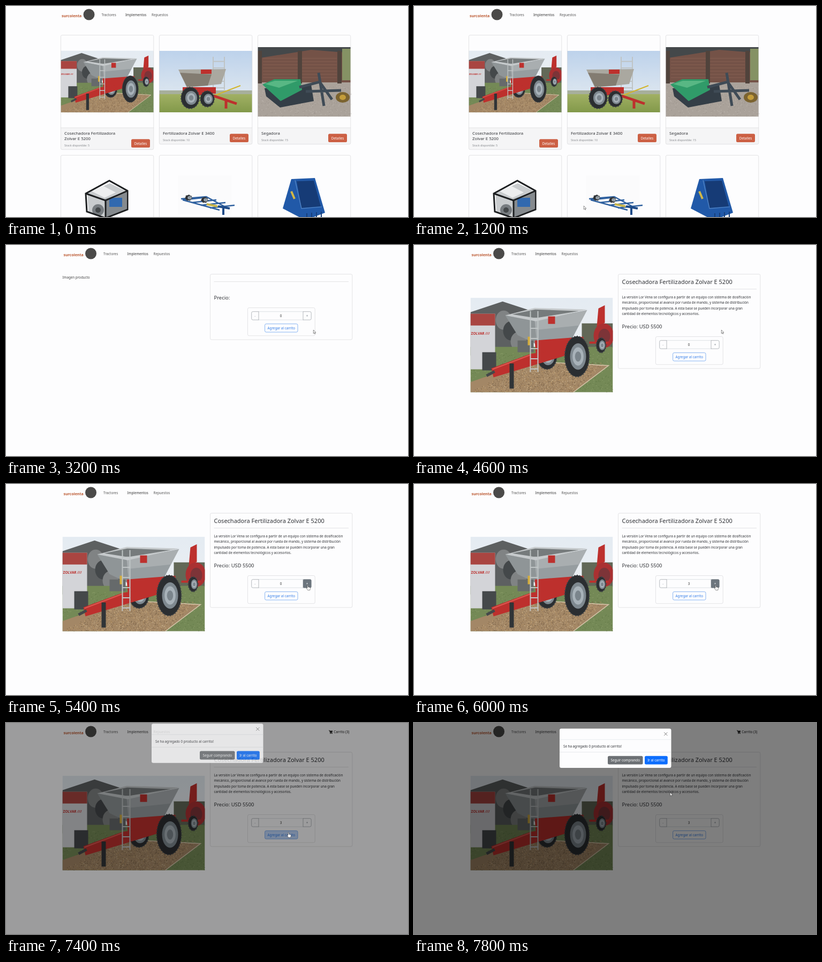
An HTML page for the animation above (8 s loop, 751 by 395 pixels).

```html
<!DOCTYPE html>
<html lang="es">
<head>
<meta charset="utf-8">
<title>Tienda de equipos</title>
<style>
  html, body { margin: 0; width: 100%; height: 100%; overflow: hidden; background: #fdfdfe; }
  svg { display: block; width: 100%; height: 100%; }
  text { font-family: "Noto Sans", "Open Sans", sans-serif; white-space: pre; }
</style>
</head>
<body>
<svg id="stage" viewBox="0 0 751 395"></svg>
<script>
const LOOP = 8000, STEP = 200;
const OPENED = 2200, LOADED = 4600, ADDED = 7400;
const MODEL = 'Zolvar E 5200';
const PAPER = '#fdfdfe', INK = '#303236', LINE = '#d9d9dc', GREY = '#6c757d', EDGE = '#979da2';
const RED = '#bd302d', STEEL = '#a9aeb0', DARK = '#44484a', BLUE = '#0d6efd', SOFT_BLUE = '#5795ec';
const BODY = 6.25;

const text = (x, y, size, str, fill = '#444', more = '') =>
  `<text x="${x}" y="${y}" font-size="${size}" fill="${fill}" ${more}>${str}</text>`;
const mid = (x, y, str, fill) => text(x, y, BODY, str, fill, 'text-anchor="middle"');
const rect = (x, y, w, h, fill, more = '') =>
  `<rect x="${x}" y="${y}" width="${w}" height="${h}" fill="${fill}" ${more}/>`;
const box = (x, y, w, h, r = 2.6, stroke = LINE) =>
  rect(x, y, w, h, 'none', `rx="${r}" stroke="${stroke}" stroke-width=".7"`);
const poly = (fill, points) => `<polygon fill="${fill}" points="${points}"/>`;
const line = (stroke, width, d) =>
  `<path d="${d}" fill="none" stroke="${stroke}" stroke-width="${width}"/>`;
const oval = (x, y, rx, ry, fill) => `<ellipse cx="${x}" cy="${y}" rx="${rx}" ry="${ry}" fill="${fill}"/>`;
const repeat = (n, make) => Array.from({ length: n }, (_, i) => make(i)).join('');
const during = (from, to, body) => `<g data-from="${from}" data-to="${to}">${body}</g>`;
const gradient = (id, top, bottom) => `<linearGradient id="${id}" x2="0" y2="1">
  <stop stop-color="${top}"/><stop offset="1" stop-color="${bottom}"/></linearGradient>`;
const mix = (a, b, k) => a + (b - a) * k;

let seed = 7;
const random = () => (seed = seed * 16807 % 2147483647) / 2147483647;

// Seeded specks between two horizontal edges, each given as [y, left, right].
const specks = (top, bottom, count, size, colours) => colours.map(colour =>
  line(colour, size, repeat(count, () => {
    const v = random(), [y, left, right] = top.map((a, i) => mix(a, bottom[i], v));
    return `M${mix(left, right, random()).toFixed(1)} ${y.toFixed(1)}h${size * 1.5}`;
  }))).join('');

const wheel = (x, y, rx, ry) => oval(x, y, rx, ry, '#2b2e31') +
  `<ellipse cx="${x}" cy="${y}" rx="${rx}" ry="${ry}" fill="none" stroke="#42464a" stroke-width="2" stroke-dasharray="2 3"/>` +
  ['#7f8990', '#a8b2b9', '#7b858c'].map((c, i) =>
    oval(x + 2, y, rx * (.65 - i * .2), ry * (.65 - i * .2), c)).join('');

const ladder = (x, y, width, height, rungs) => line('#bfc4c5', 2,
  `M${x} ${y}v${height}M${x + width} ${y}v${height}` +
  repeat(rungs, i => `M${x} ${y + (i + .7) * height / rungs}h${width}`));

const spreader = '<symbol id="spreader" viewBox="0 0 266 177">' +
  rect(0, 0, 266, 177, 'url(#haze)') +
  poly('#5d6061', '0,27 60,7 112,24 112,108 0,108') +
  repeat(3, i => oval(62 + i * 14, 42 + i * 20, 15, 18, i % 2 ? DARK : '#808384')) +
  rect(208, 48, 58, 45, '#626857') +
  rect(0, 92, 266, 85, '#748956') + specks([104, 0, 266], [177, 0, 266], 350, 1, ['#5f7643', '#8a9d68']) +
  poly('#a38766', '0,158 110,119 258,127 192,177 0,177') +
  specks([122, 105, 250], [177, 0, 192], 450, 1, ['#c9b18c', '#775f45', '#b79466']) +
  line('#d3c3a8', 1.5, 'M110 119L258 127L192 177') +
  rect(0, 30, 46, 104, '#d3d4d8') + rect(0, 30, 46, 22, '#a94541') + rect(22, 102, 26, 34, DARK) +
  text(1, 69, 6.5, 'ZOLVAR ///', RED, 'font-weight="700"') +
  poly(RED, '239,20 251,14 251,47 236,54') +
  oval(249, 71, 19, 23, '#aa3132') + oval(250, 72, 11, 14, '#7d3438') + line(RED, 4, 'M222 84H258') +
  wheel(244, 89, 9, 14) + wheel(143, 112, 18, 22) +
  poly('#8f9597', '65,33 122,43 125,88 88,70') +
  poly(STEEL, '120,42 218,23 188,80 124,86') +
  poly('#969da0', '124,60 202,52 188,80 124,86') +
  poly('#c6cacc', '65,33 120,19 218,22 122,44') + poly('#767b7c', '78,31 121,22 202,25 122,38') +
  rect(145, 35, 13, 14, RED) + rect(88, 80, 30, 22, '#666a6b') + rect(107, 73, 5, 16, '#d2ac3f') +
  poly(RED, '120,80 211,73 211,92 122,104') +
  poly(RED, '39,132 112,105 185,94 185,106 43,149') + line('#dc5850', 2, 'M41 134L112 107') +
  line(DARK, 5, 'M30 146L45 138') + line('#303437', 8, 'M77 123V170') +
  ladder(112, 25, 14, 114, 6) + wheel(199, 110, 23, 38) + '</symbol>';

const field = rect(286, 84, 174, 115, 'url(#sky)') + rect(286, 158, 174, 8, '#a7af9c') +
  rect(286, 165, 174, 34, 'url(#field)') + ladder(387, 95, 21, 62, 5) +
  poly('#aaa8a0', '322,119 411,118 402,146 338,153') + poly('#837c71', '325,125 384,128 377,149 338,151') +
  rect(364, 119, 20, 8, RED) + line('#d2b52d', 2, 'M386 169L438 149') +
  rect(330, 152, 62, 12, RED) + line(RED, 5, 'M348 162L390 169L431 183M411 175V192') +
  wheel(376, 174, 13, 15) + wheel(344, 172, 17, 20);

const shed = rect(470, 77, 174, 130, '#aaa29a') + rect(470, 77, 174, 66, '#745247') +
  repeat(7, i => line('#8c6254', .8, `M480 ${98 + i * 6}H618`)) +
  poly(DARK, '470,77 644,77 644,88 570,82 470,98') +
  [474, 549, 623].map(x => line('#50433c', 8, `M${x} 84V145`)).join('') + rect(628, 80, 16, 59, '#859264') +
  specks([150, 470, 644], [207, 470, 644], 200, 1, ['#bbb4ad', '#9b938c']) +
  poly('#343e47', '483,154 570,147 575,178 512,190 486,169') +
  poly('#309b69', '479,147 501,137 550,137 553,157 513,178') + poly('#58b784', '484,146 502,140 545,140 510,153') +
  line('#3f4b56', 5, 'M548 152L586 142L609 175M584 125L594 187M560 160L626 158') +
  oval(629, 171, 13, 10, '#7b6330') + oval(629, 171, 6, 5, '#c49d3b');

const generator = poly('#c9ccce', '152,350 194,332 225,347 225,380 187,395 154,385') +
  poly('#edeeef', '157,345 182,337 205,349 184,359') + poly('#858a8e', '184,362 225,347 225,380 187,395') +
  rect(193, 359, 24, 17, '#3169af') + oval(172, 382, 11, 11, '#777c80') + oval(172, 382, 5, 5, DARK) +
  line('#1c1e20', 3, 'M149 351L193 327L227 346V381L186 397L151 385ZM149 351L186 364V397M186 364L227 346');

const trailer = rect(321, 317, 100, 73, '#fbfbfc') +
  line('#2e609f', 2.5, 'M327 361L374 357L415 379M330 363L399 382' +
    repeat(4, i => `M${330 + i * 17} ${363 + i * 5}l46 -5`)) +
  [341, 371].map((x, i) => wheel(x, 359 + i * 4, 6, 5)).join('') +
  line('#c7b54a', 4, 'M375 371l20 4') + line('#1d4a87', 4, 'M396 375l22 4M406 378v13');

const bucket = poly('#2159a8', '533,324 577,322 596,387 559,401 517,379') +
  poly('#163b76', '543,328 575,327 588,375 552,378') + line('#5587c6', 1.2, 'M540 326L552 379L590 376') +
  line('#d1b747', 4, 'M533 347l6 14') + repeat(4, i => line('#173f7b', 2, `M${562 + i * 9} ${388 - i}v10`));

const header = x =>
  text(x, 21, 7, 'surcolenta', '#bb572f', 'font-weight="700"') + oval(x + 51, 16, 10.5, 10.5, '#4b4a49') +
  text(x + 74.5, 19.2, BODY, 'Tractores', '#555') +
  text(x + 119, 19.2, BODY, 'Implementos', '#333') +
  text(x + 168, 19.2, BODY, 'Repuestos', '#555');

const button = (x, y, w, label, fill) => rect(x, y, w, 15.8, fill, 'rx="2.5"') +
  mid(x + w / 2, y + 10.3, label, '#fff');

function productCard(column, lines, stock, photo) {
  const x = 102 + column * 184, extra = (lines.length - 1) * 10, bottom = 258.7 + extra;
  return photo +
    rect(x + .5, 228, 173, bottom - 228, '#f5f5f6') + line(LINE, .7, `M${x} 228h174`) +
    box(x + .4, 54.5, 173.4, bottom - 54.5) + box(x + .4, 279.4, 173.4, 214) +
    lines.map((s, i) => text(x + 7, 240.6 + i * 10, 7.8, s, INK)).join('') +
    text(x + 7, 253 + extra, 5.36, 'Stock disponible: ' + stock, '#85888c') +
    button(x + 132, 239.2 + extra, 35, 'Detalles', '#cc6044');
}

const catalogue = header(104) +
  productCard(0, ['Cosechadora Fertilizadora', MODEL], 5,
    '<use href="#spreader" x="102" y="83.5" width="174" height="115.8"/>') +
  productCard(1, ['Fertilizadora Zolvar E 3400'], 10, field) +
  productCard(2, ['Segadora'], 15, shed) + generator + trailer + bucket +
  during(1800, OPENED, rect(0, 389, 33, 6, '#cfcfd1') + text(1, 394, 4.5, 'producto/1', '#999'));

const description = [
  'La versión Lor Vena se configura a partir de un equipo con sistema de dosificación',
  'mecánico, proporcional al avance por rueda de mando, y sistema de distribución',
  'impulsado por toma de potencia. A esta base se pueden incorporar una gran',
  'cantidad de elementos tecnológicos y accesorios.'
].map((s, i) => text(388.5, 100.4 + i * 10.05, BODY, s, INK)).join('');

const addButton = 'Agregar al carrito';
const buyBox = box(451.5, 171.5, 125.7, 52.3) +
  box(458.7, 178.7, 111.5, 15.5, 2.5, EDGE) + rect(472, 178, 83, 17, PAPER) +
  line('#ced4da', .7, 'M472 178.7h83M472 194.2h83') + line(EDGE, .7, 'M472 178.5v16M555 178.5v16') +
  mid(465.3, 188.8, '-', EDGE) + mid(562.5, 188.8, '+', GREY) +
  during(5400, 6200, rect(555, 178.5, 15.4, 16, GREY, 'rx="2"') + mid(562.5, 188.8, '+', '#fff')) +
  `<g id="count">${mid(513.5, 188.9, '0', '#333')}</g>` +
  during(ADDED, ADDED + STEP, rect(483.6, 201.7, 61.4, 15.4, BLUE, 'rx="2.5" opacity=".25"')) +
  box(483.6, 201.7, 61.4, 15.4, 2.5, SOFT_BLUE) + mid(514.3, 211.9, addButton, '#2f7be8') +
  during(6600, ADDED, button(483.4, 201.5, 61.8, addButton, BLUE));

const cart = line('#222', 1, 'M603 14h1.5l1.3 4.7h3.7') + poly('#222', '604.7,14.5 610.3,14.5 609.3,17.7 605.6,17.7') +
  oval(606, 19.6, .8, .8, '#222') + oval(609, 19.6, .8, .8, '#222') + text(612.2, 19.2, BODY, 'Carrito (3)', '#222');

const panel = (height, rule) => box(381.5, 54.6, 265.4, height) + line(LINE, .7, `M388.5 ${rule}H640`);

const detail = header(107.5) +
  during(OPENED, LOADED, panel(122.6, 68.6) + text(105.5, 63.2, BODY, 'Imagen producto') +
    text(388.5, 102, 9.4, 'Precio:', INK)) +
  during(LOADED, LOOP, panel(176.6, 82.5) +
    '<use href="#spreader" x="105.5" y="98.7" width="266" height="177"/>' +
    text(388.5, 73.2, 11, 'Cosechadora Fertilizadora ' + MODEL, INK) + description +
    text(388.5, 156.3, 9.4, 'Precio: USD 5500', INK)) +
  `<g id="buy">${buyBox}</g>` + during(ADDED, LOOP, cart);

const dialog = rect(272, 10.5, 208.5, 73.5, PAPER, 'rx="3.3"') +
  line('#dee2e6', .7, 'M272 31h208.5M272 54.5h208.5') +
  line('#777', 1, 'M467.3 17.5l6 6m0 -6l-6 6') +
  text(279, 46, BODY, 'Se ha agregado 0 producto al carrito!', INK) +
  button(362, 61.8, 65.5, 'Seguir comprando', '#6c7074') + button(431, 61.8, 42.8, 'Ir al carrito', BLUE);

const pointerShape = (id, d) => `<path id="${id}" d="${d}" fill="#fff" stroke="#333" stroke-width=".55"/>`;

document.getElementById('stage').innerHTML =
  `<defs>${gradient('haze', '#e4ebf2', '#f2f3f3')}${gradient('sky', '#bdd2eb', '#e9eef1')}${gradient('field', '#a1b064', '#82994a')}${spreader}</defs>` +
  rect(0, 0, 751, 395, PAPER) +
  during(0, OPENED, catalogue) + during(OPENED, LOOP, detail) +
  '<rect id="shade" width="751" height="395"/>' +
  during(ADDED, LOOP, `<g id="dialog">${dialog}</g>`) +
  during(1200, LOOP, '<g id="cursor">' +
    pointerShape('arrow', 'M0 0V6.6L1.6 5.2L2.6 7.5L3.6 7L2.6 4.8H4.6Z') +
    pointerShape('hand', 'M0 0Q1-.8 1.4.5V3.2L5 4Q5.8 4.4 5.4 6L4.7 9.3H.8L-1.8 5.6Q-1.8 4.4-.1 5.4Z') + '</g>');

// Pointer moves: start, end, destination, and whether it lands on a button.
const moves = [
  { from: 1000, to: 1800, x: 248, y: 261.5, hand: true },
  { from: 2200, to: 3200, x: 574.3, y: 159 },
  { from: 5000, to: 5400, x: 563, y: 189.5, hand: true },
  { from: 6000, to: 6600, x: 527, y: 205, hand: true },
  { from: 7400, to: 7800, x: 478.6, y: 130 }
];
const clamp = (v, low, high) => Math.min(high, Math.max(low, v));
const ease = k => k * k * (3 - 2 * k);

function pointerAt(t) {
  let x = 330, y = 395, hand = false;
  for (const move of moves) {
    if (t < move.from) break;
    const k = clamp((t - move.from) / (move.to - move.from), 0, 1);
    x = mix(x, move.x, ease(k));
    y = mix(y, move.y, ease(k));
    hand = k === 0 ? hand : k === 1 && !!move.hand;
  }
  return { x, y, hand };
}

const $ = id => document.getElementById(id);
const show = (node, on) => node.style.display = on ? '' : 'none';
const spans = [...document.querySelectorAll('[data-from]')];

function draw() {
  const t = Math.floor(performance.now() % LOOP / STEP) * STEP;
  for (const g of spans) show(g, t >= +g.dataset.from && t < +g.dataset.to);

  const { x, y, hand } = pointerAt(t);
  $('cursor').setAttribute('transform', `translate(${x} ${y})`);
  show($('arrow'), !hand);
  show($('hand'), hand);

  $('count').firstChild.textContent = clamp((t - 5400) / STEP, 0, 3);
  $('buy').setAttribute('transform', `translate(0 ${t < LOADED ? -54 : 0})`);

  // The dialog's fade is caught once, part way through.
  const fade = t < ADDED ? 0 : t === ADDED ? .77 : 1;
  $('shade').setAttribute('opacity', fade / 2);
  $('dialog').setAttribute('opacity', fade);
  $('dialog').setAttribute('transform', `translate(0 ${(fade - 1) * 40})`);
  requestAnimationFrame(draw);
}
draw();
</script>
</body>
</html>
```
